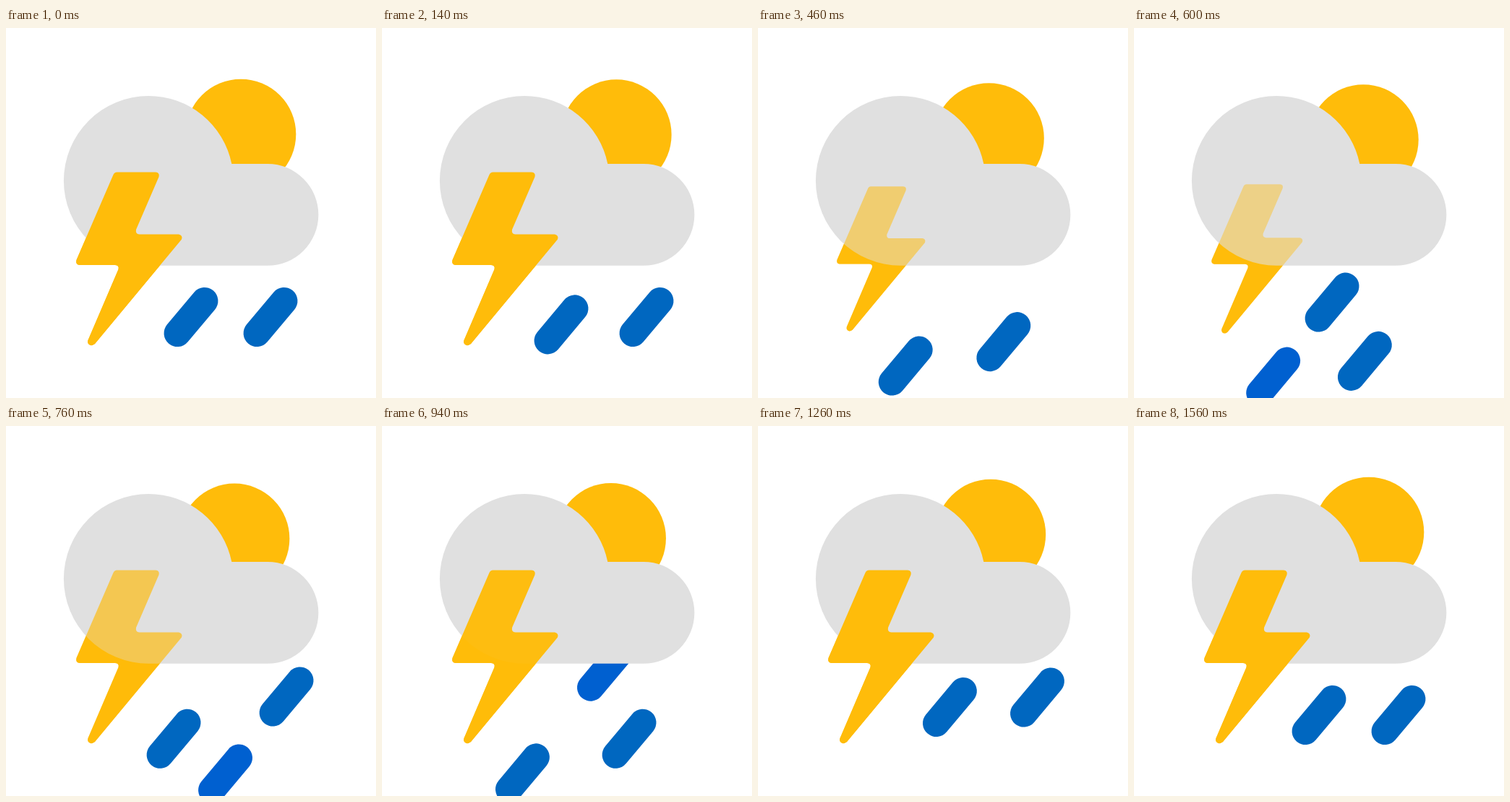
Write an HTML page with a canvas that moves like this. It is 512 px wide and 512 px high and loops after 1.58 s.

```html
<!DOCTYPE html>
<html>
<head>
<meta charset="utf-8">
<title>Thunderstorm with sun</title>
<style>
  html, body { margin: 0; width: 100%; height: 100%; overflow: hidden; background: #fff; }
  canvas { display: block; width: 100vmin; height: 100vmin; }
</style>
</head>
<body>
<canvas id="stage" width="512" height="512"></canvas>
<script>
const ctx = document.getElementById('stage').getContext('2d');
const LOOP = 1580;
const YELLOW = '#ffbc0a', GREY = '#e0e0e0', BLUE = '#0067c0', FAINT_BLUE = '#0060d0';

const cloud = new Path2D('M197.3 94A117.4 117.4 0 0 0 197.3 328.8H362A70.4 70.4 0 0 0 362 188H312.3A117.4 117.4 0 0 0 197.3 94Z');
const bolt = new Path2D('M153.5 199.5H207Q213 200 211.5 206L180 279Q179 285 184.5 285.5H239Q245 287 243 292.5' +
  'L123 437Q118 441 114.5 437.5Q112.5 435.5 113.5 432L155.5 334Q157 328.5 151 328H101.5Q96 327 97.5 321' +
  'L148.5 203Q150 199.5 153.5 199.5Z');
const boltCenter = [170, 319.5];

// Offsets from a drop's resting place
const REST = [0, 0], HIGH = [53.5, -62.7], NEAR = [33.5, -40], LOW = [-64, 83.5];

// x: resting place; each fall runs from one offset to another
const falls = [
  { x: 256, start: 0, length: 640, from: REST, to: LOW },
  { x: 366, start: 180, length: 640, from: REST, to: LOW },
  { x: 256, start: 470, length: 520, from: NEAR, to: LOW },
  { x: 366, start: 650, length: 520, from: NEAR, to: LOW },
  { x: 256, start: 880, length: 520, from: HIGH, to: REST },
  { x: 366, start: 1040, length: 520, from: NEAR, to: REST }
];

const mix = (a, b, p) => a + (b - a) * p;

function ease(t, start, end) {
  const u = Math.min(1, Math.max(0, (t - start) / (end - start)));
  return u * u * (3 - 2 * u);
}

// Rises from 0 to 1 at the peak and falls back
const pulse = (t, start, peak, end) => ease(t, start, peak) - ease(t, peak, end);

function drawSun(t) {
  const shift = 4.5 * (1 - Math.cos(Math.PI * (t < 810 ? t / 810 : Math.min(2, 1 + (t - 810) / 750))));
  ctx.fillStyle = YELLOW;
  ctx.beginPath();
  ctx.arc(325 - shift, 147 + shift, 76.3, 0, Math.PI * 2);
  ctx.fill();
}

function drawDrop(t, { x, start, length, from, to }) {
  const end = start + length;
  if (t <= start && from !== REST || t >= end && to !== REST) return;
  const p = ease(t, start, end);
  const cx = x + mix(from[0], to[0], p);
  const cy = 400 + mix(from[1], to[1], p);
  const faint = from === REST && p > 0.95 || to === REST && p < 0.05;
  ctx.strokeStyle = faint ? FAINT_BLUE : BLUE;
  ctx.lineWidth = 37.5;
  ctx.lineCap = 'round';
  ctx.beginPath();
  ctx.moveTo(cx + 18.7, cy - 22.3);
  ctx.lineTo(cx - 18.7, cy + 22.3);
  ctx.stroke();
}

function drawBolt(t, alpha) {
  const scale = 1 - 0.2 * pulse(t, 300, 520, 740);
  const [x, y] = boltCenter;
  ctx.save();
  ctx.globalAlpha = alpha;
  ctx.translate(x, y);
  ctx.scale(scale, scale);
  ctx.translate(-x, -y);
  ctx.fillStyle = YELLOW;
  ctx.fill(bolt);
  ctx.restore();
}

function draw() {
  const t = performance.now() % LOOP;
  ctx.clearRect(0, 0, 512, 512);
  drawSun(t);
  falls.forEach(fall => drawDrop(t, fall));
  // The bolt stays solid outside the cloud and fades only over it
  drawBolt(t, 1);
  ctx.fillStyle = GREY;
  ctx.fill(cloud);
  drawBolt(t, 1 - 0.6 * pulse(t, 220, 560, 1000));
  requestAnimationFrame(draw);
}
draw();
</script>
</body>
</html>
```
